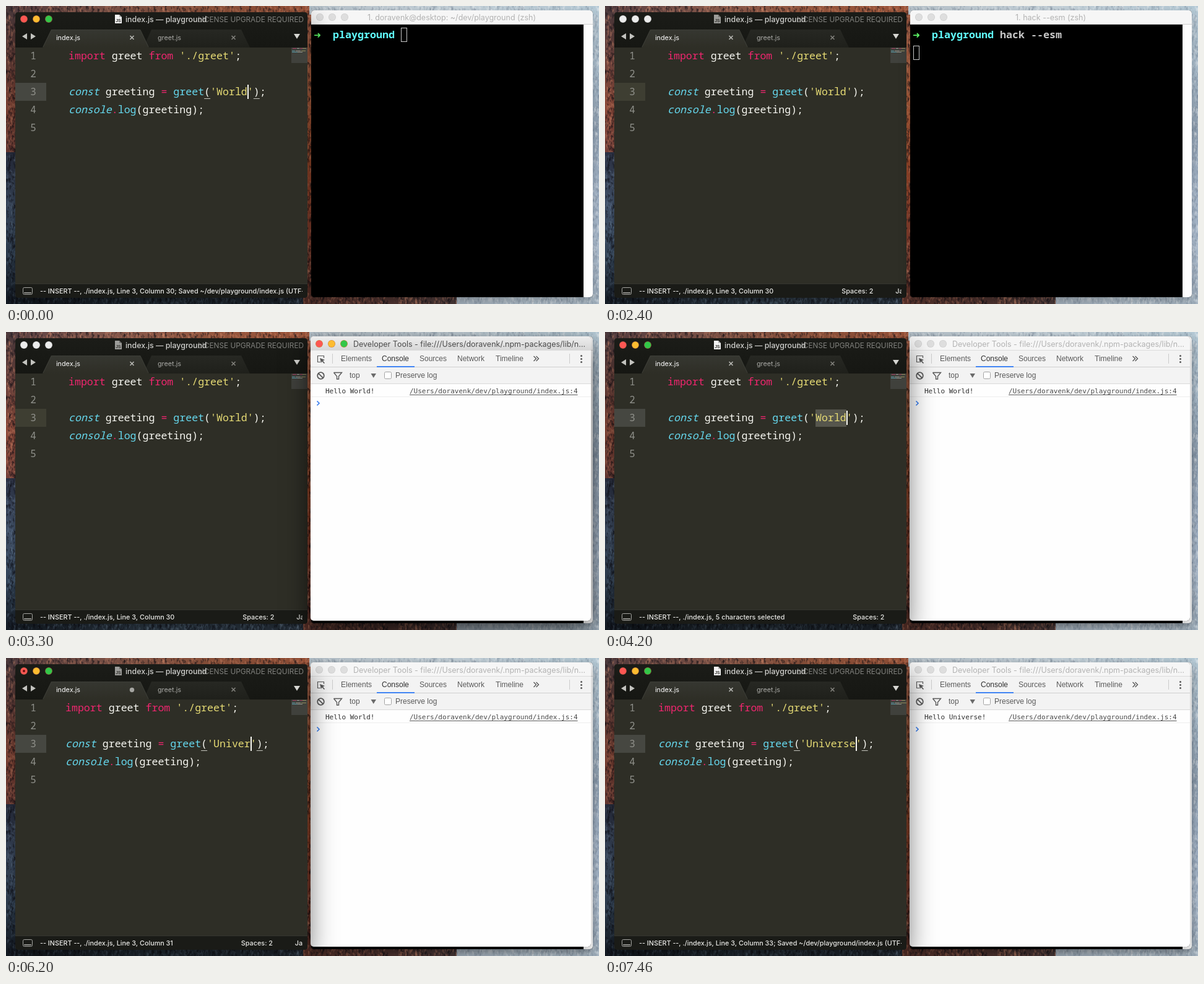
Recreate the animation shown at these times as an HTML page with a canvas. Size 958 px wide and 481 px high, loop 8000 ms.

```html
<!DOCTYPE html>
<html lang="en">
<head>
<meta charset="utf-8">
<title>Live reload demo</title>
<style>
html, body { margin: 0; width: 100%; height: 100%; overflow: hidden; background: #000; }
canvas { display: block; }
</style>
</head>
<body>
<canvas id="stage" width="958" height="481"></canvas>
<script>
const W = 958, H = 481, LOOP = 8000;
const ctx = document.getElementById('stage').getContext('2d');

const UI = 'Inter, Roboto, sans-serif';
const SANS = '"Liberation Sans", sans-serif';
const MONO = '"Noto Sans Mono", "DejaVu Sans Mono", monospace';
const MENLO = '"DejaVu Sans Mono", monospace';
const PINK = '#f0266f', WHITE = '#f8f8f2', YELLOW = '#e6db74', BLUE = '#66d9ef';
const LIGHTS = ['#fc5753', '#fdbc30', '#33c748'];

const USER = 'doravenk';
const SHELL_TITLE = `1. ${USER}@desktop: ~/dev/playground (zsh)`;
const TOOLS_TITLE = `Developer Tools - file:///Users/${USER}/.npm-packages/lib/n…`;
const LOG_LINK = `/Users/${USER}/dev/playground/index.js:4`;

const KEYS = [4760, 4960, 5130, 5800, 6030, 6200, 6330, 6360];
const SAVED = 6930;
const CHAR = 9.96, LINE = 29;

function rect(x, y, w, h, color) {
  ctx.fillStyle = color;
  ctx.fillRect(x, y, w, h);
}

function frame(x, y, w, h, color) {
  ctx.strokeStyle = color;
  ctx.lineWidth = 1;
  ctx.strokeRect(x + .5, y + .5, w - 1, h - 1);
}

function poly(points, color) {
  ctx.fillStyle = color;
  ctx.beginPath();
  points.forEach(([x, y]) => ctx.lineTo(x, y));
  ctx.fill();
}

function line(points, color, width = 1) {
  ctx.strokeStyle = color;
  ctx.lineWidth = width;
  ctx.beginPath();
  points.forEach(([x, y]) => ctx.lineTo(x, y));
  ctx.stroke();
}

function disc(x, y, r, color) {
  ctx.fillStyle = color;
  ctx.beginPath();
  ctx.arc(x, y, r, 0, 7);
  ctx.fill();
}

function label(str, x, y, font, color, align = 'left') {
  ctx.font = font;
  ctx.fillStyle = color;
  ctx.textAlign = align;
  ctx.fillText(str, x, y);
  return ctx.measureText(str).width;
}

function gradient(x0, y0, x1, y1, colors) {
  const g = ctx.createLinearGradient(x0, y0, x1, y1);
  colors.forEach((c, i) => g.addColorStop(i / (colors.length - 1), c));
  return g;
}

function lights(x, y, colors, rim) {
  colors.forEach((c, i) => {
    disc(x + i * 20, y, 6, rim);
    disc(x + i * 20, y, 5.4, c);
  });
}

function paneLights(x, y, active) {
  if (active) lights(x, y, LIGHTS, '#d0843c');
  else lights(x, y, Array(3).fill('#dedede'), '#cbcbcb');
}

// Casts the window shadow, then paints the body clipped to the rounded frame.
function pane(x, y, w, h, active, paint) {
  ctx.save();
  ctx.shadowColor = `rgba(0,0,0,${active ? .6 : .28})`;
  ctx.shadowBlur = active ? 46 : 18;
  ctx.shadowOffsetY = active ? 16 : 7;
  ctx.fillStyle = '#000';
  ctx.beginPath();
  ctx.roundRect(x, y, w, h, 5);
  ctx.fill();
  ctx.restore();
  ctx.save();
  ctx.beginPath();
  ctx.roundRect(x, y, w, h, 5);
  ctx.clip();
  paint();
  ctx.restore();
}

function titleBar(x, y, w, h, active) {
  rect(x, y, w, h, active ? gradient(0, y, 0, y + h, ['#eeeeee', '#d6d6d6']) : '#f6f6f6');
}

let seed = 11;
const rand = () => (seed = seed * 16807 % 2147483647) / 2147483647;

// A strip of backdrop: gradient along its long side, broken up by small facets.
function rock(x, y, w, h, colors, dark, light) {
  const end = w > h ? [x + w, y] : [x, y + h];
  ctx.save();
  ctx.beginPath();
  ctx.rect(x, y, w, h);
  ctx.clip();
  rect(x, y, w, h, gradient(x, y, ...end, colors));
  for (let i = 0; i < w * h / 14; i++) {
    const px = x + rand() * w, py = y + rand() * h - 3, s = 2 + rand() * 4;
    poly([[px, py], [px + s * .7, py + s * .5], [px + s * .1, py + s * 1.7]], rand() < .5 ? dark : light);
  }
  ctx.restore();
}

function makeBackdrop() {
  const shade = 'rgba(14,14,22,.42)', glow = 'rgba(225,150,120,.28)';
  const frost = 'rgba(150,175,200,.16)';
  rock(0, 0, 22, 240, ['#4a393c', '#6d443f', '#8f4c3c', '#74403a'], shade, glow);
  rock(0, 236, 22, 245, ['#2d3346', '#42526a', '#35465a', '#141b24'], shade, frost);
  rock(15, 0, 475, 16, ['#5c4244', '#885a4d', '#96583f', '#9c5439'], shade, glow);
  rock(15, 465, 475, 16, ['#161d25', '#2b3742', '#232c36'], shade, frost);
  rock(480, 14, 20, 467, ['#a86148', '#bd6a45', '#a8502f', '#934532', '#5a332c'], shade, glow);
  rock(490, 465, 240, 16, ['#59352e', '#4f332f', '#4a3a3a'], shade, glow);
  const mist = 'rgba(95,112,132,.2)', snow = 'rgba(255,255,255,.22)';
  rock(490, 0, 468, 14, ['#b8c4cc', '#c6d3db', '#b5cad6'], mist, snow);
  rock(940, 12, 18, 469, ['#b7cad7', '#adc0d0', '#95a6b8', '#a9bace', '#aebfd2', '#a3b3c2'], mist, snow);
  rock(728, 465, 230, 16, ['#a5b2be', '#b1c0cc', '#a9b9c6'], mist, snow);
  return ctx.getImageData(0, 0, W, H);
}

function codeLines(word) {
  return [
    [['import', PINK], [' greet ', WHITE], ['from', PINK], [' ', WHITE], ["'./greet'", YELLOW], [';', WHITE]],
    [],
    [['const', BLUE, 1], [' greeting ', WHITE], ['=', PINK], [' greet', BLUE], ['(', WHITE],
      [`'${word}'`, YELLOW], [');', WHITE]],
    [['console', BLUE, 1], ['.', PINK], ['log', BLUE], ['(greeting);', WHITE]],
    []
  ];
}

function drawCode(s) {
  const left = 101 - 5 * (s.word.length - 5);
  const col = n => left + n * CHAR;
  const end = 24 + s.word.length;

  rect(15, 124, 50, 29, s.editing ? '#464741' : '#3e3e32');
  if (s.selected) rect(col(24), 125, CHAR * s.word.length, 28, '#56564d');

  codeLines(s.word).forEach((tokens, row) => {
    const y = 86 + row * LINE;
    label(row + 1, 44, y, `16px ${MONO}`, '#8f908a', 'center');
    let n = 0;
    for (const [str, color, italic] of tokens) {
      label(str, col(n), y, `${italic ? 'italic ' : ''}16.6px ${MONO}`, color);
      n += str.length;
    }
  });

  if (!s.editing) return;
  if (!s.selected) {
    rect(col(22), 149, 10, 1, '#c4c4bc');
    rect(col(end + 1), 149, 10, 1, '#c4c4bc');
  }
  rect(Math.round(col(end)), 127, 2, 23, WHITE);
}

function drawTabs(s) {
  poly([[222, 67], [235, 38], [380, 38], [394, 67]], gradient(0, 38, 0, 67, ['#272823', '#1f201b']));
  poly([[59, 67], [73, 38], [217, 38], [231, 67]], gradient(0, 38, 0, 67, ['#363731', '#2e2e26']));
  line([[60, 66], [73.5, 38.5], [217, 38.5], [230, 66]], '#3d3e38');
  label('index.js', 81, 55, `10.8px ${UI}`, '#ffffff');
  label('greet.js', 245, 55, `10.8px ${UI}`, '#a9a9a5');
  const cross = (x, color) => {
    line([[x - 3, 48], [x + 3, 54]], color, 1.6);
    line([[x + 3, 48], [x - 3, 54]], color, 1.6);
  };
  if (s.dirty) disc(203.5, 51.5, 3.7, '#a5a5a1');
  else cross(203.5, '#b9b9b5');
  cross(367.5, '#80807b');
  poly([[26, 49], [34, 44], [34, 54]], '#c3c3bf');
  poly([[48, 49], [40, 44], [40, 54]], '#c3c3bf');
  poly([[465, 45], [475, 45], [470, 53]], '#d6d6d2');
}

function drawStatus(s) {
  rect(15, 448, 472, 23, '#1a1b17');
  rect(15, 448, 472, 1, '#34352f');
  ctx.strokeStyle = '#a6a6a2';
  ctx.lineWidth = 1;
  ctx.beginPath();
  ctx.roundRect(27.5, 454.5, 15, 11, 2);
  ctx.stroke();
  rect(29, 462, 12, 2, '#8a8a86');
  ctx.save();
  ctx.beginPath();
  ctx.rect(50, 449, 429, 22);
  ctx.clip();
  const font = `500 10.8px ${UI}`;
  const x = 55 + label(s.status, 55, 464, font, '#e9e9e6') + 110;
  label('Spaces: 2', x, 464, font, '#e9e9e6');
  label('JavaScript', x + 87, 464, font, '#e9e9e6');
  ctx.restore();
}

function drawMinimap(word) {
  rect(461, 67, 26, 25, '#40413c');
  rect(463, 68, 6, 1, '#a33b5f');
  rect(470, 68, 4, 1, '#96968f');
  rect(475, 68, 4, 1, '#a33b5f');
  rect(479, 68, 6, 1, '#8f8a5c');
  rect(462, 72, 5, 1, '#5d98a3');
  rect(468, 72, 8, 1, '#96968f');
  rect(477, 72, 2 + word.length, 1, '#8f8a5c');
  rect(462, 74, 9, 1, '#5d98a3');
  rect(471, 74, 8, 1, '#96968f');
}

function drawEditor(s) {
  pane(15, 10, 472, 461, s.editing, () => {
    rect(15, 10, 472, 461, '#2e2e26');
    rect(15, 10, 472, 57, gradient(0, 10, 0, 67, ['#1b1c18', '#161713']));
    if (s.editing) lights(29, 21, LIGHTS, '#8d4b35');
    else lights(29, 21, Array(3).fill('#ececec'), '#b5b5b5');
    if (s.dirty) disc(29, 21, 2, '#6b1210');

    label('LICENSE UPGRADE REQUIRED', 481, 26, `11.8px ${UI}`, '#80817d', 'right');
    const page = s.editing && !s.dirty;
    poly([[176, 14], [183, 14], [187, 18], [187, 28], [176, 28]], page ? '#f4f4f4' : '#9c9c99');
    poly([[183, 14], [183, 18], [187, 18]], page ? '#b5b5b5' : '#70706d');
    label('JS', 181.5, 26, `bold 7px ${SANS}`, '#33332f', 'center');
    label('index.js — playground', 193, 26, `500 12.4px ${UI}`, '#d0d0cd');

    drawTabs(s);
    drawCode(s);
    drawMinimap(s.word);
    drawStatus(s);
  });
}

function drawShell(s) {
  const active = s.focus === 'shell';
  pane(493, 7, 455, 463, active, () => {
    rect(493, 30, 440, 440, '#000');
    rect(933, 30, 15, 440, '#fdfdfd');
    titleBar(493, 7, 455, 22, active);
    rect(493, 29, 455, 1, active ? '#a9a9a9' : '#d0d0d0');
    paneLights(507, 18, active);
    label(s.shellTitle, 720, 23, `12.5px ${UI}`, active ? '#4b4b4b' : '#b3b3b3', 'center');
    label('➜', 497, 52, 'bold 14.5px "DejaVu Sans", sans-serif', '#5ffa68');
    label('playground', 528, 52, `bold 16.67px ${MONO}`, '#60fdff');
    if (s.typed) label('hack --esm', 638, 52, `600 16.67px ${MONO}`, '#c7c7c7');
    const [x, y] = s.entered ? [498, 64] : [s.typed ? 738 : 638, 35];
    if (active) rect(x, y, 10, 23, '#c7c7c7');
    else frame(x, y, 10, 23, '#c7c7c7');
  });
}

function drawToolIcons() {
  const ink = '#5a5a5a';
  line([[508, 48.5], [503.5, 48.5], [503.5, 38.5], [513.5, 38.5], [513.5, 42]], ink, 1.2);
  poly([[507, 42], [515, 45], [512, 46.5], [515, 50], [514, 51], [510.5, 47.5], [509, 50]], ink);
  for (const x of [852.5, 856.5]) line([[x, 39], [x + 4, 43], [x, 47]], ink, 1.4);
  for (const y of [38, 43, 48]) disc(929.5, y + .5, 1.5, ink);
}

function drawFilterBar(context) {
  const ink = '#5a5a5a';
  rect(492, 57, 453, 27, '#f3f3f3');
  rect(492, 83, 453, 1, '#d9d9d9');
  ctx.strokeStyle = ink;
  ctx.lineWidth = 1.8;
  ctx.beginPath();
  ctx.arc(508.5, 70.5, 5.3, 0, 7);
  ctx.stroke();
  line([[504.8, 66.8], [512.2, 74.2]], ink, 1.8);
  line([[529.5, 65.5], [542.5, 65.5], [537.5, 71.5], [537.5, 76], [534.5, 76], [534.5, 71.5], [529.5, 65.5]], ink, 1.4);
  if (context) label('top', 555, 74, `12px ${SANS}`, ink);
  poly([[589.5, 67], [598, 67], [593.7, 74]], '#6b6b6b');
  ctx.beginPath();
  ctx.roundRect(611.5, 64.5, 11, 11, 2);
  ctx.fillStyle = '#fff';
  ctx.fill();
  ctx.strokeStyle = '#a3a3a3';
  ctx.lineWidth = 1;
  ctx.stroke();
  label('Preserve log', 629, 74, `12px ${SANS}`, ink);
}

function drawConsole(log) {
  if (log) {
    label(log, 516, 99, `11px ${MENLO}`, '#303030');
    const w = label(LOG_LINK, 652, 99, `11px ${MENLO}`, '#4a4a4a');
    rect(652, 101, w, 1, '#5a5a5a');
    rect(492, 104, 453, 1, '#ededed');
  }
  const y = log ? 115 : 94;
  line([[502.5, y - 3.5], [506, y], [502.5, y + 3.5]], '#3b7ff0', 1.7);
}

function drawTools(s) {
  const active = s.focus === 'tools';
  pane(492, 7, 453, 459, active, () => {
    rect(492, 7, 453, 459, '#fefefe');
    titleBar(492, 7, 453, 23, active);
    rect(492, 30, 453, 27, '#f3f3f3');
    rect(492, 29, 453, 1, '#dcdcdc');
    rect(492, 56, 453, 1, '#cfcfcf');
    paneLights(506, 19, active);
    const ink = active ? '#4b4b4b' : '#b3b3b3';
    if (s.tools > 2) label(TOOLS_TITLE, 561, 24, `12.5px ${UI}`, ink);
    else label('Developer Tools', 718, 24, `12.5px ${UI}`, ink, 'center');

    rect(527, 35, 1, 16, '#cccccc');
    rect(910, 35, 1, 16, '#cccccc');
    const tabs = { Elements: 541, Console: 607, Sources: 668, Network: 729, Timeline: 791 };
    for (const name in tabs) {
      label(name, tabs[name], 47, `12px ${SANS}`, name === 'Console' ? '#303030' : '#5a5a5a');
    }
    rect(599, 55, 61, 2, '#4285f4');
    if (s.tools > 0) drawToolIcons();
    if (s.tools > 1) {
      drawFilterBar(s.context);
      drawConsole(s.log);
    }
  });
}

function stateAt(t) {
  const keys = KEYS.filter(k => t >= k).length;
  const focus = t < 500 ? 'editor' : t < 1060 ? '' : t < 2400 ? 'shell'
    : t < 3060 ? '' : t < 4200 ? 'tools' : 'editor';
  const word = keys ? 'Universe'.slice(0, keys) : 'World';
  const selected = t >= 4200 && !keys;
  const saved = t < 1060 || t >= SAVED;
  const place = selected ? '5 characters selected' : `Line 3, Column ${25 + word.length}`;
  return {
    focus, word, selected,
    editing: focus === 'editor',
    dirty: keys > 0 && t < SAVED,
    status: `-- INSERT --, ./index.js, ${place}` +
      (saved ? '; Saved ~/dev/playground/index.js (UTF-8)' : ''),
    typed: t >= 1130,
    entered: t >= 1600,
    shellTitle: t < 1630 ? SHELL_TITLE : '1. hack --esm (zsh)',
    tools: [3060, 3100, 3200, 3300].filter(k => t >= k).length - 1,
    context: t < 7160 || t >= 7330,
    log: t < 3300 ? '' : t < 7330 ? 'Hello World!' : t < 7460 ? '' : 'Hello Universe!'
  };
}

const backdrop = makeBackdrop();

function draw(t) {
  const s = stateAt(t);
  const drawRight = () => {
    drawShell(s);
    if (s.tools >= 0) drawTools(s);
  };
  ctx.putImageData(backdrop, 0, 0);
  if (s.editing) {
    drawRight();
    drawEditor(s);
  } else {
    drawEditor(s);
    drawRight();
  }
}

const start = performance.now();
function tick() {
  draw((performance.now() - start) % LOOP);
  requestAnimationFrame(tick);
}
tick();
</script>
</body>
</html>
```
